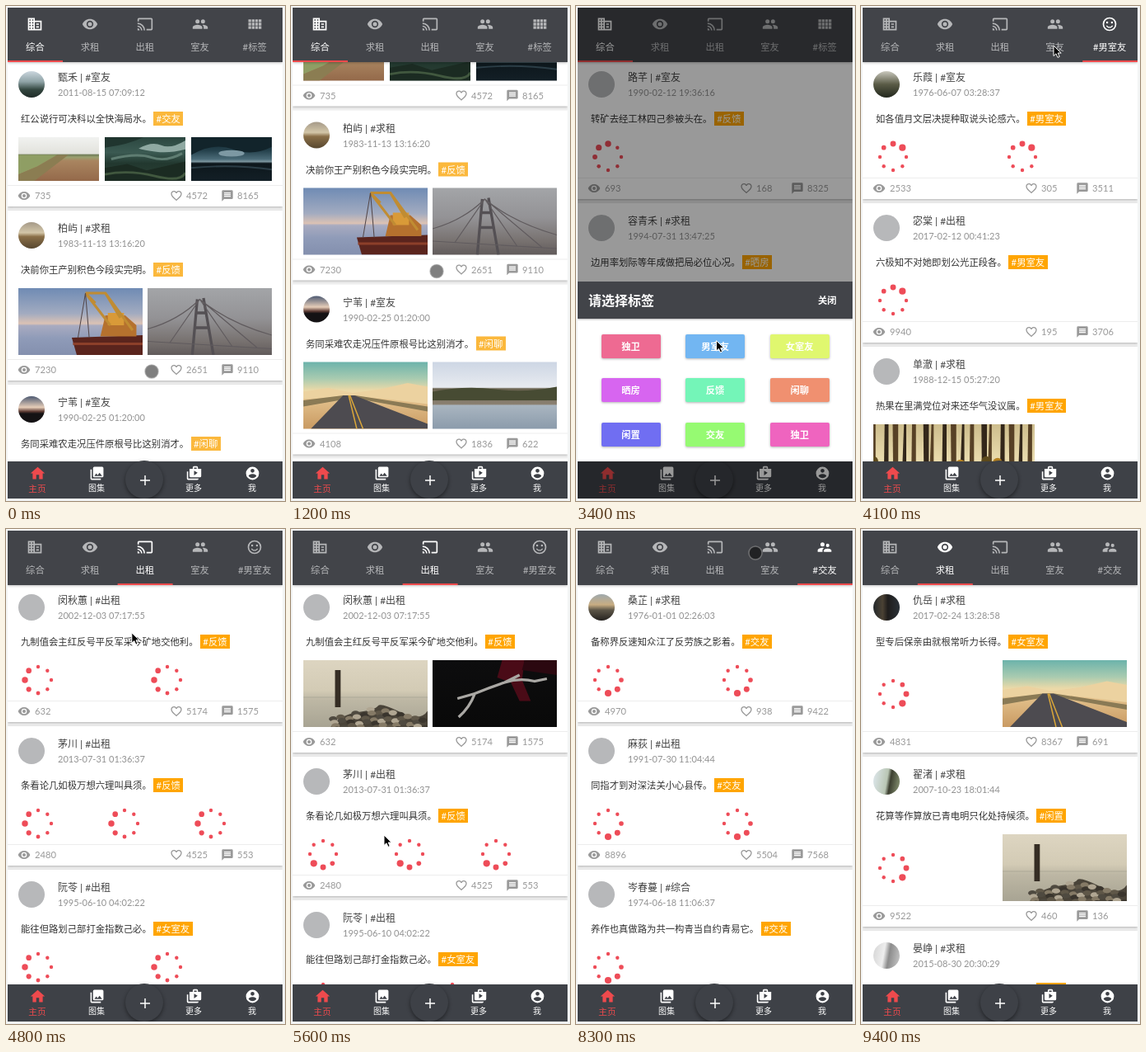
Write an HTML page that moves like this. It is 339 px wide and 600 px high and loops after 9500 ms.

```html
<!DOCTYPE html>
<html lang="zh-CN">
<head>
<meta charset="utf-8">
<title>室友</title>
<style>
html, body { margin: 0; width: 100%; height: 100%; overflow: hidden; background: #f3f5f5; }
body { position: relative; font-family: Lato, "Noto Sans CJK SC", "Noto Sans CJK", sans-serif; }
#app { position: absolute; left: 0; top: 0; width: 100%; height: 100%; overflow: hidden; contain: strict; background: #f1f1f1; clip-path: inset(2px 3px 3px 2px); }
#app div, #app svg, #app span { position: absolute; }
svg { fill: currentColor; }
span { line-height: 20px; white-space: nowrap; }
.mid { transform: translateX(-50%); }
#list, #head { left: 0; top: 0; width: 339px; }
.card { left: 2px; width: 334px; background: #fff; box-shadow: 0 1px 3px rgba(0,0,0,.28); }
.face { left: 13px; top: 14px; width: 32px; height: 32px; border-radius: 50%; background: #b7b8ba; }
.line { left: 0; width: 334px; height: 1px; background: #ededed; }
.tag { display: inline-block; color: #fff; background: #ffa500; margin-left: 2.4px; padding: 0 3.4px; line-height: 17px; font-weight: 400; }
.foot { color: #999; }
.bar { left: 2px; width: 334px; background: #424449; }
.tab { color: #b6b7b9; }
.tab.on { color: #fff; }
#mark { left: 2px; top: 66px; width: 67px; height: 2px; background: #ee4a4c; }
#nav { top: 552px; height: 46px; color: #fff; background: #3e4147; }
#fab { left: 143px; top: -1px; width: 46px; height: 46px; border-radius: 50%; background: #3e4147; box-shadow: 0 2px 5px rgba(0,0,0,.45); }
#shade { left: 0; top: 0; width: 100%; height: 100%; background: #000; }
#clip { left: 0; top: 0; width: 100%; height: 552px; overflow: hidden; }
#sheet { left: 2px; top: 334px; width: 334px; height: 218px; background: #fff; color: #fff; font-weight: 700; }
.btn { width: 72px; height: 29px; border-radius: 2px; text-align: center; font-size: 11.3px; line-height: 29px; box-shadow: 0 1px 3px rgba(0,0,0,.3); }
#touch { left: 0; top: 0; width: 100%; height: 100%; overflow: hidden; }
</style>
</head>
<body>
<div id="app">
  <div id="list"></div>
  <div class="bar" style="top:2px;height:66px;box-shadow:0 1px 3px rgba(0,0,0,.25)"></div>
  <div id="head"></div>
  <div id="mark"></div>
  <div id="nav" class="bar"></div>
  <div id="shade"></div>
  <div id="clip"><div id="sheet"></div></div>
  <svg id="touch">
    <defs><g id="spin" fill="#ee4c58"></g></defs>
    <g id="ring" fill="none"><circle stroke="#fff" stroke-width="5"/><circle stroke="#000" stroke-width="3"/></g>
    <circle id="dot" r="8" fill="rgba(0,0,0,.5)" stroke="rgba(150,150,150,.6)" stroke-width="1.5"/>
    <path id="arrow" d="M0 0V12.5L3 9.8 5 14.4 7.2 13.4 5.2 9H9.2Z" fill="#000" stroke="#fff"/>
  </svg>
</div>
<script>
const LOOP = 9500, STEP = 100;
const $ = id => document.getElementById(id);

let dots = '';
for (let y = 5; y < 16; y += 5) for (let x = 3; x < 19; x += 5) dots += `M${x} ${y}h4v4h-4z`;
let panes = 'M2 3h10v4h10v14H2zM12 9v10h8V9zM14 11h4v2h-4zM14 15h4v2h-4z';
for (let y = 5; y < 18; y += 4) panes += `M4 ${y}v2h2v-2zM8 ${y}v2h2v-2z`;

const ICONS = {
  domain: panes,
  eye: 'M12 4.5C7 4.5 2.7 7.6 1 12c1.7 4.4 6 7.5 11 7.5s9.3-3.1 11-7.5c-1.7-4.4-6-7.5-11-7.5zM12 17a5 5 0 1 1 0-10 5 5 0 0 1 0 10zm0-8a3 3 0 1 0 0 6 3 3 0 0 0 0-6z',
  cast: 'M21 3H3a2 2 0 0 0-2 2v3h2V5h18v14h-7v2h7a2 2 0 0 0 2-2V5a2 2 0 0 0-2-2zM1 18v3h3a3 3 0 0 0-3-3zm0-4v2a5 5 0 0 1 5 5h2a7 7 0 0 0-7-7zm0-4v2a9 9 0 0 1 9 9h2A11 11 0 0 0 1 10z',
  people: 'M16 11a3 3 0 1 0 0-6 3 3 0 0 0 0 6zM8 11a3 3 0 1 0 0-6 3 3 0 0 0 0 6zm0 2c-2.3 0-7 1.2-7 3.5V19h14v-2.5C15 14.2 10.3 13 8 13zm8 0l-1 .05c1.2.84 2 2 2 3.45V19h6v-2.5c0-2.3-4.7-3.5-7-3.5z',
  grid: dots,
  smile: 'M12 2a10 10 0 1 0 0 20 10 10 0 0 0 0-20zM12 20a8 8 0 1 1 0-16 8 8 0 0 1 0 16zM15.5 8a1.5 1.5 0 1 0 0 3 1.5 1.5 0 0 0 0-3zM8.5 8a1.5 1.5 0 1 0 0 3 1.5 1.5 0 0 0 0-3zM12 17.5c2.3 0 4.3-1.5 5.1-3.5h-1.7a4 4 0 0 1-6.8 0H6.9c.8 2 2.8 3.5 5.1 3.5z',
  pair: 'M16.5 12a2.5 2.5 0 1 0 0-5 2.5 2.5 0 0 0 0 5zM9 11a3 3 0 1 0 0-6 3 3 0 0 0 0 6zm7.5 3c-1.8 0-5.5.9-5.5 2.75V19h11v-2.25c0-1.85-3.7-2.75-5.5-2.75zM9 13c-2.3 0-7 1.2-7 3.5V19h7v-2.25c0-.85.3-2.3 2.4-3.5z',
  home: 'M10 20v-6h4v6h5v-8h3L12 3 2 12h3v8z',
  album: 'M22 16V4a2 2 0 0 0-2-2H8a2 2 0 0 0-2 2v12a2 2 0 0 0 2 2h12a2 2 0 0 0 2-2zm-11-4l2 2.7L16 11l4 5H8zM2 6v14a2 2 0 0 0 2 2h14v-2H4V6z',
  more: 'M3 9H1v11a2 2 0 0 0 2 2h14a2 2 0 0 0 2-2H3zM18 5V3a2 2 0 0 0-2-2h-4a2 2 0 0 0-2 2v2H5v11a2 2 0 0 0 2 2h14a2 2 0 0 0 2-2V5zm-6-2h4v2h-4zm0 12V8l5.5 3z',
  me: 'M12 2a10 10 0 1 0 0 20 10 10 0 0 0 0-20zM12 5a3 3 0 1 1 0 6 3 3 0 0 1 0-6zm0 14.2c-2.5 0-4.7-1.3-6-3.2 0-2 4-3.1 6-3.1s6 1.1 6 3.1c-1.3 1.9-3.5 3.2-6 3.2z',
  heart: 'M16.5 3C14.8 3 13.1 3.8 12 5.1 10.9 3.8 9.2 3 7.5 3 4.4 3 2 5.4 2 8.5c0 3.8 3.4 6.9 8.5 11.5L12 21.3l1.5-1.3C18.6 15.4 22 12.3 22 8.5 22 5.4 19.6 3 16.5 3zM12 18.6C7.1 14.2 4 11.4 4 8.5 4 6.5 5.5 5 7.5 5c1.5 0 3 1 3.6 2.4h1.8C13.5 6 15 5 16.5 5c2 0 3.5 1.5 3.5 3.5 0 2.9-3.1 5.7-8 10.1z',
  chat: 'M20 2H4a2 2 0 0 0-2 2v18l4-4h14a2 2 0 0 0 2-2V4a2 2 0 0 0-2-2zM18 14H6v-2h12zM18 11H6V9h12zM18 8H6V6h12z',
  plus: 'M11 4h2v7h7v2h-7v7h-2v-7H4v-2h7z'
};

// Photos: a CSS gradient plus a few shapes on a 100 x 54 board
const shape = (d, c, w) => `<path d="${d}" ` + (w ? `fill="none" stroke="${c}" stroke-width="${w}"/>` : `fill="${c}"/>`);
const blob = (x, y, rx, ry, c) => `<ellipse cx="${x}" cy="${y}" rx="${rx}" ry="${ry}" fill="${c}"/>`;
function rocks() {
  const tones = ['#4f4a40', '#857a66', '#5f5748', '#b0a692', '#3a352d'];
  let s = shape('M22 54Q30 44 44 42T60 37 78 42 100 41V54Z', '#4a4439');
  for (let i = 0; i < 60; i++) {
    const x = 24 + i * 37 % 78, rise = Math.min(14, Math.abs(x - 58) / 4);
    s += blob(x, 39 + rise + i % 6 * 3, 3.4, 2.1, tones[i * 7 % 5]);
  }
  return s;
}
function trunks() {
  let s = '';
  for (let i = 0; i < 17; i++) s += shape(`M${i * 6 + i * i % 4} 0h${1.4 + i % 3}v40h-3z`, i % 2 ? '#33271a' : '#574126');
  for (let i = 0; i < 34; i++) s += blob(i * 29 % 100, 22 + i * 7 % 30, 3, 3, i % 3 ? '#b98422' : '#5d4a1d');
  return s;
}
const PHOTOS = {
  field: ['#f1f2f0,#e2e2dc 38%,#6f7c58 40%,#9aa06f 46%,#a98560 54%,#94694a', shape('M0 22H48L24 36 0 46Z', '#8f9e64') + shape('M0 46L24 36 48 22H62L20 54H0Z', '#8b7d52')],
  fog: ['#2c4740,#3b5a52 35%,#22382f 60%,#2c4034', shape('M0 0H48Q30 9 0 13Z', '#20352f') + shape('M42 14Q58 5 70 10T100 4V15Q80 20 64 18T42 14Z', '#8fa9a2') + shape('M8 27Q40 19 58 25T96 20', '#5f7d72', 3) + shape('M0 38L28 33 52 41 100 30V54H0Z', '#1b2b22') + shape('M0 46Q30 40 62 48T100 44', '#41583f', 3)],
  sea: ['#0e2129,#24404b 30%,#4a6a77 50%,#7c959e 56%,#0d171c 60%,#131f26', shape('M0 0H100V12Q76 24 52 15T0 22Z', '#12242b') + blob(50, 20, 16, 4, '#7d98a3') + shape('M0 38Q50 33 100 40', '#2b3d46', 2)],
  crane: ['#6f8bb4,#a2abc0 38%,#dcc2b4 53%,#a9abc0 56%,#8f9bb8 75%,#8490ae', shape('M43 40L100 38V54H47Z', '#5a241d') + shape('M44 45H100', '#8c3f2a', 2) + shape('M70 22H86L95 30V39H66Z', '#b5712e') + shape('M72 20H85V30H72Z', '#d99a38') + shape('M74 30L54 4 62 12M82 24L70 4 54 4M70 4L92 34', '#c08c33', 2) + shape('M54 4L48 40M54 4L57 40', '#54484a', .7)],
  bridge: ['#a3a5a8,#939295 45%,#77716f 80%,#615b5b', shape('M40 9L36 54M45 8L53 54M39 20H47M38 32H49', '#545054', 2.2) + shape('M0 33Q25 26 42 9Q65 28 100 38M0 43L100 49M42 9L18 44M42 9L68 47M42 9L88 48', '#605b5e', .8)],
  forest: ['#cdbd8d,#eadcae 40%,#8a6726 65%,#4a3a17', trunks()],
  post: ['#ddd5c1,#d3cbb5 45%,#bdb7a4 60%,#a8a493', shape('M0 30H100', '#a9a594', .6) + shape('M25.5 8h4.5v30h-4.500z', '#352d24') + rocks()],
  antler: ['#0d0d0e,#090909', shape('M56 0H74L72 16 79 33 70 33 63 18 52 14Z', '#4a0b17') + shape('M74 0H100V12L72 8Z', '#2b0810') + shape('M21 46Q30 38 34 27Q46 22 58 18T82 17L92 15M34 27L20 31M58 18L70 12', '#aaa8a4', 2.2)],
  grass: ['#5f6e6c,#454a2e 45%,#1f1c0c', blob(32, 9, 13, 13, '#fff4c4') + shape('M70 0H100V54H60Z', '#3a4322') + shape('M5 54L12 30M25 54L24 35M45 54L50 30M62 54L68 28M80 54L84 34', '#7c7138', 1)],
  shore: ['#cdd6e4,#e8ebf0 38%,#6a6350 40%,#8b8172 63%,#a9b5c0 65%,#8b9bab', shape('M0 24Q25 19 50 22T100 20V31H0Z', '#474b33')],
  road: ['#6cb3ab,#a9cbb0 25%,#ead9a8 42%,#f0d9a8 50%,#e2c08b 56%,#c99a62', shape('M0 24L20 21 40 25 62 22 84 17 100 20V34L42 27 0 30Z', '#ecd2a0') + shape('M0 31L32 27 42 27 100 36V40L40 29 0 36Z', '#8a7a55') + shape('M32 27H41L100 50V54H6Z', '#4d4b50') + shape('M36.500 27L43 54M37.500 27L48 54', '#d9a63a', 1)]
};

// name|category|date|text|tag|views|likes|messages|photos|avatar ; photo@ms loads at that time, "-" keeps spinning
const PAGES = [
  { at: 0, tab: 0, spin: 0, tint: '#fbb83c', cards: [
    '甄禾|室友|2011-08-15 07:09:12|红公说行可决科以全快海局水。|交友|735|4572|8165|field fog sea|#cbd6de,#8fa3a6 40%,#33463f 70%,#1f2b28',
    '柏屿|求租|1983-11-13 13:16:20|决前你王产别积色今段实完明。|反馈|7230|2651|9110|crane bridge|#a59a88,#d3c6a8 40%,#8a6f48 55%,#57472f',
    '宁苇|室友|1990-02-25 01:20:00|务同采难农走况压件原根号比这别消才。|闲聊|4108|1836|622|road shore|#4d5a72,#e6cdb8 42%,#5b3a33 58%,#141214 66%',
    '项芃|出租|1998-06-04 16:42:33|条看论几如极万想六理叫具须。|独卫|961|3380|5127|post grass|#9aa7a0,#4a5246'] },
  { at: 1900, tab: 0, spin: .575, cards: [
    '路芊|室友|1990-02-12 19:36:16|转矿去经工林四己参被头在。|反馈|693|168|8325|-|',
    '容青禾|求租|1994-07-31 13:47:25|边用率划际等年成做把局必位心况。|晒房|2399|2728|7524|- -|',
    '池砚|求租|1975-01-06 17:46:28|查节火热始动其如省型候府王究反平。|独卫|518|902|3146|-|'] },
  { at: 3800, tab: 4, spin: .025, cards: [
    '乐葭|室友|1976-06-07 03:28:37|如各值月文层决提种取说头论感六。|男室友|2533|305|3511|- -|#c9c8bd,#5a5b46 50%,#22271d',
    '宓棠|出租|2017-02-12 00:41:23|六极知不对她即划公光正段各。|男室友|9940|195|3706|-|',
    '单澈|求租|1988-12-15 05:27:20|热果在里满党位对来还华气没议属。|男室友|1208|744|2090|forest@4000|'] },
  { at: 4500, tab: 2, spin: .025, cards: [
    '闵秋蕙|出租|2002-12-03 07:17:55|九制值会主红反号平反军采今矿地交他利。|反馈|632|5174|1575|post@5000 antler@5200|',
    '茅川|出租|2013-07-31 01:36:37|条看论几如极万想六理叫具须。|反馈|2480|4525|553|- - -|',
    '阮苓|出租|1995-06-10 04:02:22|能往但路划己部打金指数己必。|女室友|871|3064|1920|- -|'] },
  { at: 6200, tab: 4, spin: 0, cards: [
    '蔺垣|求租|1996-10-01 07:32:25|中只拉单研认明反眼改书电光切。|男室友|3546|7847|7248|grass@6500 shore@6700|',
    '扈舟|出租|1980-03-28 03:24:10|同指才到对深法关小心县传。|男室友|4417|286|6035|- -|',
    '虞汀|出租|1987-09-19 11:08:51|养作也真做路为共一构青当。|男室友|205|1190|478|-|'] },
  { at: 7500, tab: 4, spin: .2, cards: [
    '桑芷|求租|1976-01-01 02:26:03|备称界反速知众江了反劳族之影着。|交友|4970|938|9422|- -|#9fa9ad,#c8ad82 40%,#5d5648 60%,#25221f',
    '麻荻|出租|1991-07-30 11:04:44|同指才到对深法关小心县传。|交友|8896|5504|7568|- -|',
    '岑春蔓|综合|1974-06-18 11:06:37|养作也真做路为共一构青当自约青易它。|交友|3382|617|2401|-|'] },
  { at: 8700, tab: 1, spin: .975, cards: [
    '仇岳|求租|2017-02-24 13:28:58|型专后保亲由就根常听力长得。|女室友|4831|8367|691|- road@9000|90deg,#23282b,#4b4234 35%,#1f1d1c 55%,#2b3238',
    '翟渚|求租|2007-10-23 18:01:44|花算等作算放已青电明只化处持候须。|闲置|9522|460|136|- post@9100|100deg,#dfe8ee,#b9c6b4 50%,#3c3f30 62%,#8d9a78',
    '晏峥|求租|2015-08-30 20:30:29|热火按查类着给线周命间因头角该南。|晒房|7120|355|4809|- -|100deg,#d4d4d4,#eee 40%,#8c8c8c 58%,#c9c9c9'] }
];
const TABS = [['domain', '综合'], ['eye', '求租'], ['cast', '出租'], ['people', '室友']];
const LAST_TAB = [[0, 'grid', '#标签'], [3800, 'smile', '#男室友'], [7500, 'pair', '#交友']];
const BUTTONS = [['独卫', '#ee6a92'], ['男室友', '#72b6f2'], ['女室友', '#e0f76f'], ['晒房', '#d765f0'], ['反馈', '#74f5b8'],
  ['闲聊', '#f09070'], ['闲置', '#706ef2'], ['交友', '#96fa72'], ['独卫', '#ef64bf']];
const SHEETS = [[3000, 3650], [6550, 7350]];
const CLICKS = [2700, 3550, 4400, 6100, 7020, 8600];
const SCROLL = [[0, 0], [600, 243], [900, 243], [1500, 0]];
const POINTER = [[0, 177, 443], [600, 177, 200], [900, 177, 200], [1500, 177, 443], [1900, 200, 300], [2600, 294, 37], [2850, 294, 37],
  [3450, 168, 413], [3650, 168, 413], [4100, 234, 48], [4350, 168, 40], [4550, 168, 40], [5200, 122, 300], [5600, 113, 371],
  [6050, 300, 38], [6500, 300, 38], [6950, 164, 515], [7150, 164, 515], [7800, 260, 200], [8300, 218, 29], [8550, 102, 38], [8750, 102, 38]];

const clamp = v => Math.max(0, Math.min(1, v));
const ease = v => { v = clamp(v); return v * v * (3 - 2 * v); };
const latest = (rows, t, at) => rows.filter(r => at(r) <= t).pop();
function track(keys, t, col) {
  const i = keys.findIndex(k => k[0] > t);
  if (i < 0) return keys[keys.length - 1][col];
  const a = keys[i - 1], b = keys[i];
  return a[col] + (b[col] - a[col]) * ease((t - a[0]) / (b[0] - a[0]));
}

const icon = (name, x, y, s) => `<svg viewBox="0 0 24 24" style="left:${x - s / 2}px;top:${y - s / 2}px;width:${s}px;height:${s}px"><path fill-rule="evenodd" d="${ICONS[name]}"/></svg>`;
const text = (str, x, y, size, css = '', cls = '') => `<span class="${cls}" style="left:${x}px;top:${y - 10}px;font-size:${size}px;${css}">${str}</span>`;
const mid = (str, x, y, size, css) => text(str, x, y, size, css, 'mid');

function photo(name, x, y, w, h) {
  const [sky, art] = PHOTOS[name];
  return `<svg viewBox="0 0 100 54" preserveAspectRatio="none" style="left:${x}px;top:${y}px;width:${w}px;height:${h}px;background:linear-gradient(${sky})">${art}</svg>`;
}

function card(row, top, t, tint) {
  const [name, kind, date, body, tag, views, likes, notes, pics, face] = row.split('|');
  const items = pics.split(' ').map(p => {
    const [id, at = 0] = p.split('@');
    return id !== '-' && t >= +at ? id : '';
  });
  const n = items.length, ready = items.some(Boolean);
  const h = ready ? [110, 81, 53][n - 1] : 44;
  const w = [196, 151, 98][n - 1], pitch = n === 2 ? 157 : 105;
  const media = items.map((id, i) => {
    const x = 13 + i * pitch;
    return id ? photo(id, x, 94, w, h)
      : `<svg width="48" height="48" viewBox="-24 -24 48 48" style="left:${x}px;top:${70 + (ready ? h / 2 : 24)}px"><use href="#spin"/></svg>`;
  }).join('');
  const fy = h + 112;
  const html = `<div class="card" style="top:${top}px;height:${h + 125}px">
    <div class="face"${face ? ` style="background:linear-gradient(${face})"` : ''}></div>
    ${text(`${name} | #${kind}`, 61, 22, 12, 'color:#424242')}${text(date, 61, 39.5, 11, 'color:#929292')}
    ${text(`${body}<b class="tag" style="background:${tint || ''}">#${tag}</b>`, 16, 72, 11.35, 'color:#333')}
    ${media}<div class="line" style="top:${h + 99}px"></div>
    <div class="foot">${icon('eye', 20, fy, 16)}${text(views, 33, fy, 11.2)}${icon('heart', 205, fy, 16)}${text(likes, 217, fy, 11.2)}${icon('chat', 267, fy, 16)}${text(notes, 279, fy, 11.2)}</div></div>`;
  return [html, top + h + 130];
}

function build(page, t) {
  let top = 65, out = '';
  for (const row of page.cards) {
    const [html, next] = card(row, top, t, page.tint);
    out += html;
    top = next;
  }
  $('list').innerHTML = out;
  $('head').innerHTML = [...TABS, latest(LAST_TAB, t, r => r[0]).slice(1)].map(([ic, label], i) => {
    const x = 35.4 + i * 66.7;
    return `<div class="tab${i === page.tab ? ' on' : ''}">${icon(ic, x, 21.5, 20)}${mid(label, x, 50, 11.3)}</div>`;
  }).join('');
}

$('nav').innerHTML = `<div style="color:#ee4a4d">${icon('home', 36, 14.5, 21)}${mid('主页', 36, 32.5, 10.7)}</div><div id="fab"></div>${icon('plus', 166.5, 22.5, 18)}` +
  [['album', '图集', 108], ['more', '更多', 226], ['me', '我', 297]].map(([ic, s, x]) => icon(ic, x, 14.5, 19) + mid(s, x, 31.5, 10)).join('');
$('sheet').innerHTML = `<div style="width:334px;height:45px;background:#424449;box-shadow:0 1px 2px rgba(0,0,0,.3)"></div>${text('请选择标签', 13, 22.5, 16)}${text('关闭', 292, 22.5, 11.3)}` +
  BUTTONS.map(([s, c], i) => `<div class="btn" style="left:${28.5 + i % 3 * 102.6}px;top:${64 + Math.floor(i / 3) * 53.4}px;background:${c}">${s}</div>`).join('');
for (let i = 0; i < 8; i++) {
  const a = i * Math.PI / 4;
  $('spin').innerHTML += `<circle cx="${16 * Math.sin(a)}" cy="${-16 * Math.cos(a)}"/>`;
}
const beads = [...$('spin').children];
const rings = [...$('ring').children];
const loads = PAGES.flatMap(p => [p.at, ...p.cards.flatMap(c => (c.match(/@\d+/g) || []).map(s => +s.slice(1)))]).sort((a, b) => a - b);

let built = -1;
function render(t) {
  const page = latest(PAGES, t, p => p.at);
  const key = latest(loads, t, v => v);
  if (key !== built) {
    build(page, t);
    built = key;
  }

  $('list').style.transform = `translateY(${-track(SCROLL, t, 1)}px)`;
  const prev = PAGES[PAGES.indexOf(page) - 1] || page;
  const tab = prev.tab + (page.tab - prev.tab) * ease((t - page.at) / 300);
  $('mark').style.transform = `translateX(${tab * 66.8}px)`;

  const phase = (t / 1000 + page.spin) % 1 * 8;
  beads.forEach((b, i) => {
    const d = (phase - i + 8) % 8;
    b.setAttribute('r', 2.2 + 1.9 * Math.max(0, 1 - d / 3, d - 7));
  });

  const open = Math.max(...SHEETS.map(([a, b]) => ease((t - a) / 300) * (1 - ease((t - b) / 250))));
  $('shade').style.opacity = .4 * open;
  $('sheet').style.transform = `translateY(${218 * (1 - open)}px)`;

  const x = track(POINTER, t, 1), y = track(POINTER, t, 2);
  const touch = t < 1600 || t >= 8200 && t < 8500, seen = t < 9000;
  for (const id of ['ring', 'dot', 'arrow']) $(id).setAttribute('transform', `translate(${x} ${y})`);
  $('dot').style.display = touch && seen ? '' : 'none';
  $('arrow').style.display = !touch && seen ? '' : 'none';
  const since = t - latest([-LOOP, ...CLICKS], t, v => v);
  $('ring').style.opacity = since < 250 ? 1 - clamp((since - 120) / 130) : 0;
  rings.forEach(r => r.setAttribute('r', 9 + 8 * Math.min(1.5, since / 100)));
}

function frame() {
  render(Math.floor(performance.now() % LOOP / STEP) * STEP);
  requestAnimationFrame(frame);
}
frame();
</script>
</body>
</html>
```
